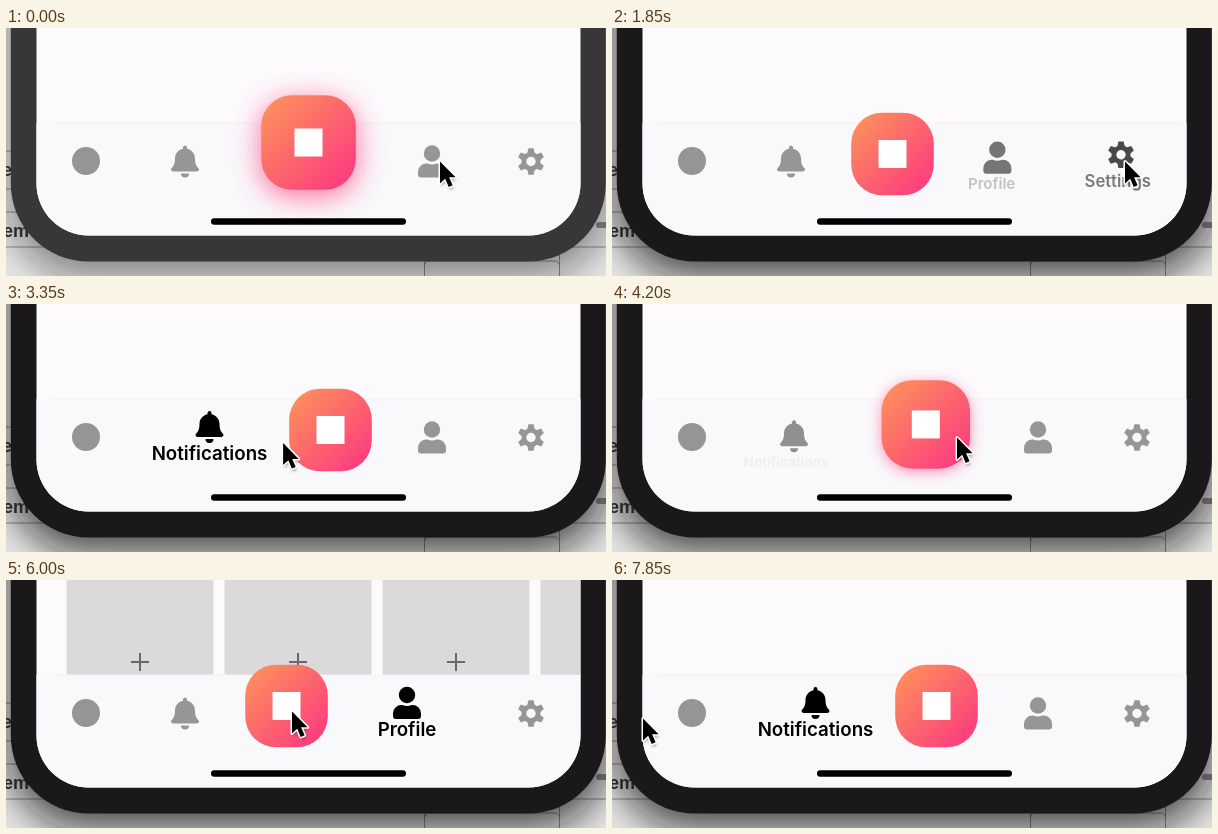
Recreate the animation shown at these times as an HTML page. Size 600 by 248 pixels, loop 8000 ms.

```html
<!DOCTYPE html>
<html lang="en">
<head>
<meta charset="utf-8">
<title>Tab bar</title>
<style>
  html, body { margin: 0; width: 100%; height: 100%; overflow: hidden; background: #e6e6e6; }
  svg { display: block; width: 600px; height: 248px; }
  .label { font: 600 18.7px Inter, "Noto Sans", sans-serif; text-anchor: middle; }
  .page { font: 700 18px "Liberation Sans", sans-serif; fill: #333; }
</style>
</head>
<body>
<svg viewBox="0 0 600 248">
  <defs>
    <linearGradient id="warm" x2="1" y2="1">
      <stop offset=".08" stop-color="#fd8f5c"/>
      <stop offset=".85" stop-color="#fc427c"/>
    </linearGradient>
    <filter id="soft" x="-50%" y="-50%" width="200%" height="200%"><feGaussianBlur stdDeviation="18"/></filter>
    <filter id="halo" x="-60%" y="-60%" width="220%" height="220%"><feGaussianBlur id="haloBlur" stdDeviation="13"/></filter>
    <filter id="drop" x="-50%" y="-50%" width="200%" height="200%"><feGaussianBlur stdDeviation="1.5"/></filter>
    <path id="arrow" d="M0 0V22L5.2 17.2L8.700 25.500L12.600 23.800L9.100 15.800H15.600Z"/>
  </defs>

  <!-- page behind the phone -->
  <rect width="600" height="248" fill="#e6e6e6"/>
  <g fill="none" stroke="#888">
    <path d="M0 123H20M0 161H20M0 184H30M0 219H600"/>
    <rect x="418.5" y="219" width="135" height="50" rx="5"/>
  </g>
  <rect x="419" y="226" width="134" height="40" fill="#e6e6e6"/>
  <path d="M418.500 248V238a5 5 0 0 1 5 -5H548.500a5 5 0 0 1 5 5V248" fill="none" stroke="#888"/>
  <text class="page" x="-4" y="148">e</text>
  <text class="page" x="-3" y="209">em</text>
  <rect x="590" y="194" width="14" height="6" rx="3" fill="#888"/>

  <!-- phone -->
  <rect id="shade" x="2" y="-200" width="601" height="450" rx="78" fill="#0c080c" filter="url(#soft)"/>
  <rect id="bezel" x="4.800" y="-200" width="595" height="433.600" rx="78"/>
  <rect x="30.500" y="-200" width="544" height="407.500" rx="52" fill="#fcfafd"/>
  <g id="tiles"></g>
  <path d="M30.500 95H574.500V155.500A52 52 0 0 1 522.500 207.500H82.500A52 52 0 0 1 30.500 155.500Z" fill="#f9f8fb"/>
  <path d="M46 95H570" stroke="#f3f1f5"/>

  <circle cx="80" cy="133" r="14" fill="#969497"/>
  <g id="items"></g>
  <rect id="glow" fill="#ff4484" rx="31" filter="url(#halo)"/>
  <rect id="button" fill="url(#warm)" rx="31"/>
  <rect id="mark" width="28" height="28" fill="#fff"/>
  <rect x="205" y="190.300" width="195" height="6.500" rx="3.250"/>

  <g id="cursor">
    <use href="#arrow" x="1" y="3" opacity=".35" filter="url(#drop)"/>
    <use href="#arrow" stroke="#fff" stroke-width="3" stroke-linejoin="round"/>
    <use href="#arrow"/>
  </g>
</svg>
<script>
const LOOP = 8000;
const $ = id => document.getElementById(id);
const mix = (a, b, p) => a + (b - a) * p;
const clamp = v => Math.min(1, Math.max(0, v));
const easeOut = p => 1 - (1 - p) ** 3;
const easeInOut = p => (1 - Math.cos(Math.PI * p)) / 2;
const set = (el, attrs) => { for (const k in attrs) el.setAttribute(k, attrs[k]); };

// Horizontal centres of every tab for each selected tab
const layouts = {
  home: { bell: 179, home: 302.5, user: 426, cog: 525 },
  user: { bell: 179, home: 280.5, user: 401, cog: 525 },
  cog:  { bell: 179, home: 280.5, user: 376.5, cog: 500 },
  bell: { bell: 203.5, home: 324.5, user: 426, cog: 525 },
};

const clicks = [
  [-1000, 'home'], [30, 'user'], [1730, 'cog'], [2830, 'bell'],
  [3990, 'home'], [4830, 'user'], [6230, 'home'], [7080, 'bell'],
];

// time, x, y
const cursorPath = [
  [0, 433, 131], [950, 433, 131], [1150, 449, 130], [1550, 512, 131],
  [1900, 512, 131], [2450, 187, 141], [3000, 187, 141], [3600, 328, 134],
  [3700, 328, 132], [3800, 344, 131], [4300, 344, 131], [4780, 430, 131],
  [5450, 430, 131], [6000, 285, 129], [6400, 285, 129], [6850, 185, 144],
  [7250, 185, 144], [7800, 30, 136], [LOOP, 30, 136],
];

const tooth = a => `<path d="M-3.6 -8.5L-2.6 -13.3H2.6L3.6 -8.5Z" transform="rotate(${a})"/>`;
const icons = {
  bell: `<path d="M0 -16a2 2 0 0 1 2 2v1.3C6.6 -11.7 10 -7.9 10 -3C10 3.4 12.2 5.3 13.5 6.7
    A2 2 0 0 1 12 10H-12A2 2 0 0 1 -13.5 6.7C-12.2 5.3 -10 3.4 -10 -3C-10 -7.9 -6.6 -11.7 -2 -12.7
    V-14a2 2 0 0 1 2 -2ZM-4 12H4A4 4 0 0 1 -4 12Z"/>`,
  user: `<circle cy="-8" r="8.2"/><path d="M-5.6 2H-4.6A11 11 0 0 0 4.6 2H5.6A8.4 8.4 0 0 1 14 10.4
    V13a3 3 0 0 1 -3 3H-11a3 3 0 0 1 -3 -3V10.4A8.4 8.4 0 0 1 -5.6 2Z"/>`,
  cog: `<circle r="7.1" fill="none" stroke-width="4.8"/>` + [0, 60, 120, 180, 240, 300].map(tooth).join(''),
};
const labels = { bell: 'Notifications', user: 'Profile', cog: 'Settings' };

$('items').innerHTML = Object.keys(icons).map(name =>
  `<g id="${name}" stroke-width="0">${icons[name]}</g>
   <text id="${name}Label" class="label" y="6">${labels[name]}</text>`).join('');

$('tiles').innerHTML = [0, 1, 2, 3].map(i => {
  const x = 60.5 + i * 158;
  return `<rect x="${x}" width="${Math.min(147, 574.5 - x)}" height="96" fill="#dbd9dc"/>` +
    (i < 3 ? `<path d="M${x + 64.5} 82h18m-9 -9v18" stroke="#69676a" stroke-width="2"/>` : '');
}).join('');

function cursorAt(t) {
  const i = cursorPath.findIndex(k => k[0] > t);
  const [t0, x0, y0] = cursorPath[i - 1], [t1, x1, y1] = cursorPath[i];
  const p = easeInOut((t - t0) / (t1 - t0));
  return [mix(x0, x1, p) + 1, mix(y0, y1, p) + 2.5];
}

function draw(t) {
  const i = clicks.findLastIndex(c => c[0] <= t);
  const [start, now] = clicks[i];
  const before = i ? clicks[i - 1][1] : now;
  const quick = easeOut(clamp((t - start) / 420));
  const slow = easeInOut(clamp((t - start) / 430));
  const active = (name, p) => mix(+(before === name), +(now === name), p);
  const place = (name, p) => mix(layouts[before][name], layouts[now][name], p);

  for (const name in icons) {
    const a = active(name, quick), x = place(name, quick);
    const grey = Math.round(mix(150, 0, a ** 1.5)), colour = `rgb(${grey},${grey},${grey})`;
    set($(name), { transform: `translate(${x} ${mix(133.5, 123, a)})`, fill: colour, stroke: colour });
    set($(name + 'Label'), {
      transform: `translate(${x - 9 * (1 - a)} ${mix(160, 150, a)}) scale(${mix(.7, 1, a)})`,
      opacity: a ** 1.5,
    });
  }

  const h = active('home', slow), x = place('home', slow);
  const y = mix(126, 114.5, h), size = mix(82.6, 94.6, h);
  const box = { x: x - size / 2, y: y - size / 2, width: size, height: size };
  set($('button'), box);
  set($('glow'), { ...box, y: box.y + 6 * h, opacity: .8 * (1 - (1 - h) ** 2) });
  set($('haloBlur'), { stdDeviation: .1 + 14 * h });
  set($('mark'), { x: x - 14, y: y - 14 });

  set($('tiles'), { opacity: active('user', clamp((t - start) / 100)) });

  const dark = clamp((t - 30) / 200);
  const tone = Math.round(mix(56, 26, dark));
  set($('bezel'), { fill: `rgb(${tone},${tone - 2},${tone})` });
  set($('shade'), { opacity: mix(.45, .7, dark) });

  set($('cursor'), { transform: `translate(${cursorAt(t)})` });
}

const begin = performance.now();
function frame() {
  draw((performance.now() - begin) % LOOP);
  requestAnimationFrame(frame);
}
frame();
</script>
</body>
</html>
```
